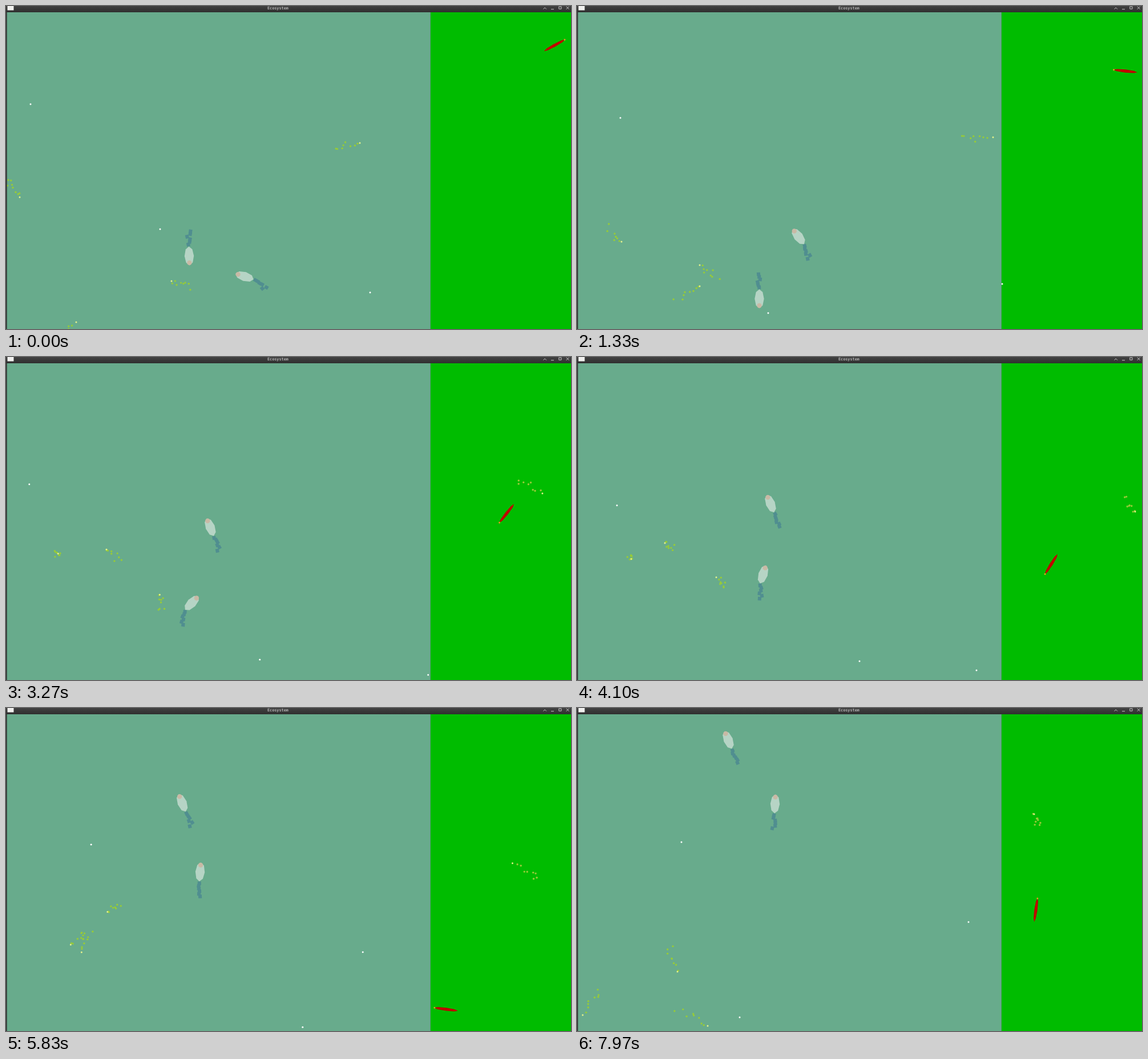
Recreate the animation shown at these times as an HTML page with a canvas. Size 990 px wide and 566 px high, loop 8 s.

```html
<!DOCTYPE html>
<html lang="en">
<head>
<meta charset="utf-8">
<title>Ecosystem</title>
<style>
  html, body { margin: 0; width: 990px; height: 566px; overflow: hidden; background: #333; }
  canvas { display: block; }
  h1 { position: absolute; left: 458px; top: 0; margin: 0; color: #b4b4b4;
       font: bold 6.8px/8px "DejaVu Sans Mono", monospace; }
</style>
</head>
<body>
<canvas id="stage" width="990" height="566"></canvas>
<h1>Ecosystem</h1>
<script>
const ctx = document.getElementById('stage').getContext('2d');
const LOOP = 8000, RAD = Math.PI / 180;
const KEYS = [0, 1330, 2400, 4100, 5200, 6670, 7970];

// Screen refreshes: evenly spaced runs that get slower.
const ticks = [0];
function run(from, to, count) {
  for (let i = 0; i < count; i++) ticks.push(from + (to - from) * i / (count - 1));
}
run(170, 1100, 24);
run(1230, 1330, 2);
run(1470, 2170, 5);
run(2400, 3270, 5);
run(3500, 4100, 4);
run(4370, 5200, 4);
run(5430, 6400, 6);
run(6670, 7970, 6);

// Smooth path through rows of values, one row per key time.
function track(rows, times = KEYS) {
  const slope = (i, c) => {
    const a = Math.max(i - 1, 0), b = Math.min(i + 1, rows.length - 1);
    return (rows[b][c] - rows[a][c]) / (times[b] - times[a]);
  };
  return t => {
    if (t < 0) return rows[0].map((p, c) => p + slope(0, c) * t);
    let i = 0;
    while (i < times.length - 2 && t >= times[i + 1]) i++;
    const d = times[i + 1] - times[i], u = (t - times[i]) / d, v = 1 - u;
    return rows[i].map((p, c) =>
      v * v * (1 + 2 * u) * p + u * u * (3 - 2 * u) * rows[i + 1][c] +
      d * u * v * (v * slope(i, c) - u * slope(i + 1, c)));
  };
}

const noise = n => { const s = Math.sin(n * 127.1) * 43758.5453; return s - Math.floor(s); };
const wave = (n, t) => Math.sin(noise(n) * 6.28 + t * (0.0015 + noise(n + 50) * 0.002));

function rect(color, x, y, w, h) {
  ctx.fillStyle = color;
  ctx.fillRect(x, y, w, h);
}
function disc(color, x, y, r) {
  ctx.fillStyle = color;
  ctx.beginPath();
  ctx.arc(x, y, r, 0, 7);
  ctx.fill();
}
function octagon(color, rx, ry) {
  ctx.fillStyle = color;
  ctx.beginPath();
  for (let i = 0; i < 8; i++) ctx.lineTo(rx * Math.cos(i * 45 * RAD), ry * Math.sin(i * 45 * RAD));
  ctx.fill();
}
function placed(x, y, angle, draw) {
  ctx.save();
  ctx.translate(x, y);
  ctx.rotate(angle * RAD);
  draw();
  ctx.restore();
}

// Followers trail the leader along its own path and stray from it.
function swarm(seed, rows) {
  const path = track(rows);
  return t => {
    for (let i = 1; i <= 8; i++) {
      const [x, y] = path(t - i * 72), n = seed * 20 + i, stray = 2 + i * 0.7;
      disc('#97cb38', x + stray * wave(n, t), y + stray * wave(n + 9, t), 1.7);
    }
    disc('#e6f28c', ...path(t), 1.5);
  };
}

// Rows: x, y, heading. The tentacles swing out with the latest turn.
function squid(seed, rows) {
  const path = track(rows);
  return t => {
    const [x, y, angle] = path(t);
    const bend = angle - path(t - 750)[2];
    placed(x, y, angle, () => {
      placed(-17, 0, 180 + bend, () => {
        for (let i = 0; i < 6; i++) {
          const sway = wave(seed * 30 + i, t);
          placed(3 + i * 4.6, sway * (1 + i * 0.6), sway * 12,
            () => rect('#508e90', -3.2, -3, 6.4, 6));
        }
      });
      octagon('#b6d4c5', 16.5, 8.2);
      disc('#c9b9a5', 12, 0, 4.2);
    });
  };
}

function wanderer(rows) {
  const path = track(rows);
  return t => disc('#fff', ...path(t), 1.5);
}

const eelPath = track([
  [961, 69, -29], [968, 94, 90], [961, 114, 186], [921, 192, 142], [831, 363, 122],
  [759, 515, 126], [772, 525, 195], [761, 457, 248], [804, 354, 278]
], [0, 650, 1330, 2400, 4100, 5200, 5900, 6670, 7970]);

function eel(t) {
  placed(...eelPath(t), () => {
    octagon('#c00000', 21, 2.7);
    disc('#e0a020', 20.5, 0, 1.5);
  });
}

const creatures = [
  swarm(1, [[24, 335], [78, 413], [92, 349], [95, 354], [138, 385], [129, 493], [229, 557]]),
  swarm(2, [[123, 554], [215, 491], [272, 456], [244, 386], [147, 397], [75, 450], [10, 538]]),
  swarm(3, [[290, 482], [215, 454], [207, 366], [154, 326], [194, 345], [150, 382], [176, 462]]),
  swarm(4, [[620, 240], [729, 230], [871, 212], [978, 271], [937, 296], [821, 227], [801, 186]]),
  squid(1, [[321, 438, 88], [319.5, 513, 90], [326, 480, -5], [326, 381, -72],
    [339, 322, -82], [340, 239, -88], [347, 168, -87]]),
  squid(2, [[418, 474, -162], [388, 404, -127], [377, 342, -114], [339, 257, -112],
    [323, 198, -111], [288, 123, -113], [265, 56, -112]]),
  wanderer([[43, 172], [76, 196], [28, 185], [70, 260], [137, 256], [157, 218], [183, 235]]),
  wanderer([[270, 391], [335, 538], [396, 519], [495, 533], [583, 462], [671, 390], [686, 375]]),
  wanderer([[638, 502], [745, 487], [763, 556], [700, 549], [600, 556], [407, 560], [285, 542]]),
  eel
];

const barFill = ctx.createLinearGradient(0, 0, 0, 11);
barFill.addColorStop(0, '#424242');
barFill.addColorStop(1, '#2f2f2f');
const buttons = new Path2D('M941.5 5.5l2.7-2.7 2.7 2.7M955 5.7h5M968.8 1h4.2v4.2h-4.2zM981.7 .8l5 5m0-5l-5 5');

function windowFrame() {
  rect(barFill, 0, 0, 990, 11);
  rect('#333', 0, 11, 1.7, 555);
  rect('#f0f0ee', 2.5, 0, 11, 7.5);
  ctx.strokeStyle = '#c4c4c4';
  ctx.stroke(buttons);
}

function frame(now) {
  const time = now % LOOP;
  const t = ticks.findLast(tick => tick <= time);
  rect('#68ab8c', 0, 11, 743, 555);
  rect('#5a9a78', 743, 11, 1, 555);
  rect('#00bc00', 744, 11, 246, 555);
  creatures.forEach(draw => draw(t));
  windowFrame();
  requestAnimationFrame(frame);
}
requestAnimationFrame(frame);
</script>
</body>
</html>
```
